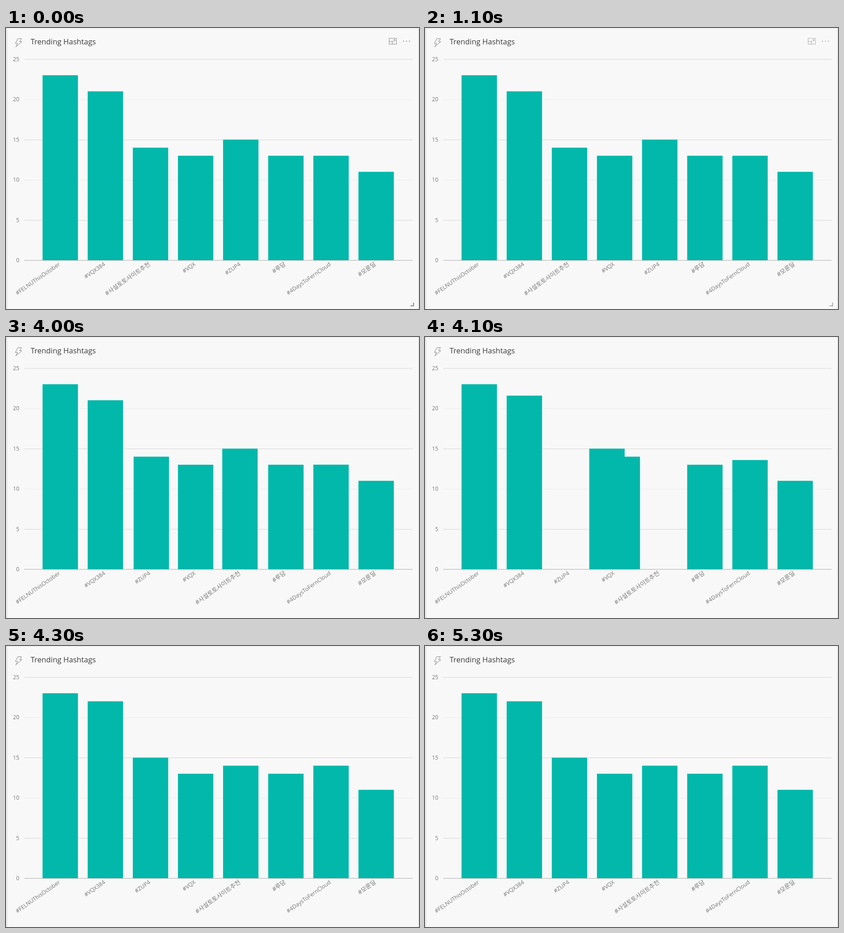
These frames come from a looping animation (906 px wide and 618 px high, 8 s). An HTML page with a canvas:

```html
<!DOCTYPE html>
<html lang="en">
<head>
<meta charset="utf-8">
<title>Trending Hashtags</title>
<style>
  html, body { margin: 0; width: 100%; height: 100%; overflow: hidden; background: #f8f8f8; }
  canvas { display: block; width: 906px; height: 618px; }
</style>
</head>
<body>
<canvas id="stage" width="906" height="618"></canvas>
<script>
const ctx = document.getElementById('stage').getContext('2d');
const LOOP = 8000, STEP = 100;
const HIDE_AT = 1100, SWAP_AT = 4000;
const BASE = 511, UNIT = 17.7, FIRST = 80.2, PITCH = 99, BAR = 77.6;
const FONT = '"Open Sans", "Noto Sans", "Noto Sans CJK KR", "Noto Sans CJK", sans-serif';

// from/to are slot and value before and after the update
const bars = [
  { tag: '#FELNUThisOctober', from: [0, 23], to: [0, 23] },
  { tag: '#VQX384', from: [1, 21], to: [1, 22] },
  { tag: '#사설토토사이트추천', from: [2, 14], to: [4, 14] },
  { tag: '#VQX', from: [3, 13], to: [3, 13] },
  { tag: '#ZUP4', from: [4, 15], to: [2, 15] },
  { tag: '#루담', from: [5, 13], to: [5, 13] },
  { tag: '#4DaysToFernCloud', from: [6, 13], to: [6, 14] },
  { tag: '#모룬딜', from: [7, 11], to: [7, 11] }
];

const mix = (a, b, p) => a + (b - a) * p;

// Coarse 100 ms progress of the eased update
function progress(t) {
  if (t < SWAP_AT) return 0;
  const steps = [0.009, 0.585, 0.843];
  return steps[Math.floor((t - SWAP_AT) / STEP)] ?? 1;
}

function toolAlpha(t) {
  if (t < HIDE_AT) return 1;
  return Math.max(0, 1 - (Math.floor((t - HIDE_AT) / STEP) + 1) / 3);
}

function rect(color, x, y, w, h) {
  ctx.fillStyle = color;
  ctx.fillRect(x, y, w, h);
}

function text(str, x, y, size, color, align) {
  ctx.font = `${size}px ${FONT}`;
  ctx.fillStyle = color;
  ctx.textAlign = align;
  ctx.fillText(str, x, y);
}

function path(points, color, closed) {
  ctx.beginPath();
  points.forEach(([x, y]) => ctx.lineTo(x, y));
  if (closed) ctx.closePath();
  ctx.strokeStyle = color;
  ctx.lineWidth = 1;
  ctx.stroke();
}

function drawCard() {
  rect('#e6e6e6', 0, 0, 906, 618);
  rect('#f8f8f8', 3, 1, 901, 617);
  path([[26, 23.5], [34, 23.5], [29.8, 30], [34.8, 30], [21.5, 41.5], [25.5, 34], [20.5, 34]], '#808080', true);
  text('Trending Hashtags', 54, 35.5, 16.5, '#3c3c3c', 'left');
}

function drawGrid() {
  for (let v = 0; v <= 25; v += 5) {
    const y = BASE - v * UNIT;
    if (v % 10 === 5) rect('#e5e5e5', 40, Math.round(y) - 1, 852, 2);
    else if (v) rect('#eaeaea', 40, Math.floor(y), 852, 1);
    text(v, 29.3, y + 4, 12.2, '#777', 'right');
  }
}

function drawBars(p) {
  for (const { from, to } of bars) {
    const h = mix(from[1], to[1], p) * UNIT;
    rect('#01b8aa', FIRST + mix(from[0], to[0], p) * PITCH, BASE - h, BAR, h);
  }
  rect('#a6a6a6', 40, BASE - 0.5, 852, 1);
}

function drawLabels(moved) {
  for (const { tag, from, to } of bars) {
    const slot = (moved ? to : from)[0];
    ctx.save();
    ctx.translate(FIRST + BAR / 2 + slot * PITCH + 0.5, 521.5);
    ctx.rotate(-35 * Math.PI / 180);
    text(tag, 0, 0, /[가-힣]/.test(tag) ? 13.2 : 12.3, '#777', 'right');
    ctx.restore();
  }
}

function drawTools(alpha) {
  if (!alpha) return;
  ctx.globalAlpha = alpha;
  const gray = '#8a8a8a';
  path([[840.5, 22.5], [856.5, 22.5], [856.5, 35.5], [840.5, 35.5]], gray, true);
  path([[840.5, 29.5], [847.5, 29.5], [847.5, 35.5]], gray);
  path([[847.5, 30.5], [853.5, 25.5]], gray);
  path([[849.5, 25.5], [853.5, 25.5], [853.5, 29.5]], gray);
  for (let i = 0; i < 3; i++) rect(gray, 871 + i * 6.5, 28, 2, 2);
  rect(gray, 887, 610, 8, 2);
  rect(gray, 893, 604, 2, 8);
  ctx.globalAlpha = 1;
}

function draw(t) {
  drawCard();
  drawGrid();
  drawBars(progress(t));
  drawLabels(t >= SWAP_AT);
  drawTools(toolAlpha(t));
}

const start = performance.now();
function tick() {
  draw((performance.now() - start) % LOOP);
  requestAnimationFrame(tick);
}
tick();
</script>
</body>
</html>
```
